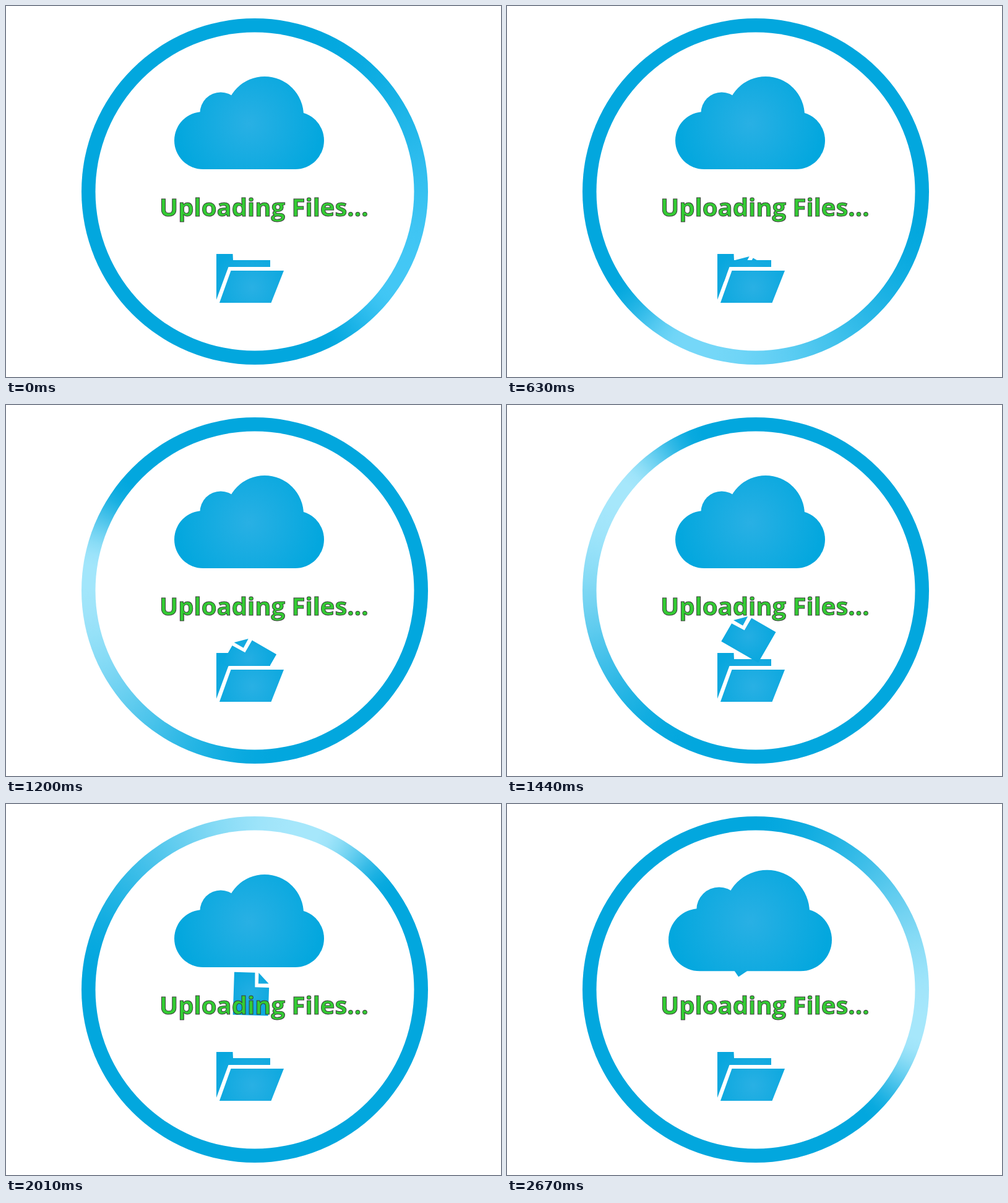
Recreate the animation shown at these times as an HTML page. Size 800 by 600 pixels, loop 2.7 s.

```html
<!DOCTYPE html>
<html lang="en">
<head>
<meta charset="utf-8">
<title>Uploading Files</title>
<style>
html, body { margin: 0; width: 100%; height: 100%; overflow: hidden; background: #fff; }
#ring { position: absolute; left: 122px; top: 20px; width: 560px; height: 560px; border-radius: 50%; }
svg { position: absolute; left: 0; top: 0; display: block; }
text { font: bold 40px "Open Sans", sans-serif; fill: #33cc33; stroke: #3a3a3a; stroke-width: 1px; }
</style>
</head>
<body>
<div id="ring"></div>
<svg width="800" height="600" viewBox="0 0 800 600">
  <defs>
    <radialGradient id="cloudFill" gradientUnits="userSpaceOnUse" cx="393" cy="190" r="118">
      <stop offset="0" stop-color="#29b0e4"/><stop offset="1" stop-color="#03a7de"/>
    </radialGradient>
    <radialGradient id="folderFill" gradientUnits="userSpaceOnUse" cx="398" cy="455" r="66">
      <stop offset="0" stop-color="#29b0e4"/><stop offset="1" stop-color="#08a7de"/>
    </radialGradient>
    <radialGradient id="pageFill" gradientUnits="userSpaceOnUse" cx="34" cy="28" r="45">
      <stop offset="0" stop-color="#24aee3"/><stop offset="1" stop-color="#08a7de"/>
    </radialGradient>
    <clipPath id="aboveFront">
      <path d="M0 0H800V422H359.5L340 475H0Z"/>
    </clipPath>
  </defs>
  <circle cx="402" cy="300" r="257.5" fill="#fff"/>
  <path fill="url(#folderFill)" d="M340 401H366.5L367 411H427V422H359.5L340 475Z"/>
  <g clip-path="url(#aboveFront)">
    <g id="page" fill="url(#pageFill)">
      <path d="M0 23.5L23.5 22.8L23.5 0H69V57H0Z"/>
      <path d="M0 17.5L17 .8L17.5 17.5Z"/>
    </g>
  </g>
  <path fill="url(#folderFill)" d="M363.5 428H449L428.5 480H345Z"/>
  <g id="cloud" fill="url(#cloudFill)">
    <rect x="272" y="171" width="242" height="93" rx="46.5"/>
    <circle cx="347" cy="173" r="33.5"/>
    <circle cx="418" cy="177" r="63"/>
    <rect x="318" y="171" width="149" height="60"/>
  </g>
  <text x="248" y="339.5">Uploading Files...</text>
</svg>
<script>
const LOOP = 2700, STEP = 30;
const BASE = [2, 167, 222], PEAK_FROM = [67, 199, 245], PEAK_TO = [166, 231, 251];
const GLOW = 140;   // length of the ring's glow in degrees
const ring = document.getElementById("ring");
const page = document.getElementById("page");
const cloud = document.getElementById("cloud");

const span = (t, from, to) => Math.max(0, Math.min(1, (t - from) / (to - from)));
const smooth = k => k * k * (3 - 2 * k);
const mix = (a, b, k) => a.map((v, i) => v + (b[i] - v) * k);

// Strength of the glow some degrees behind its head: short front, long tail
const glow = back => smooth(span(back, 0, 32)) * (1 - smooth(span(back, 38, GLOW)));

function drawRing(t) {
  const head = 67 + t * 0.128;
  const peak = mix(PEAK_FROM, PEAK_TO, span(t, 0, 1250));
  const stops = [];
  for (let back = GLOW; back >= 0; back -= 4) {
    stops.push(`rgb(${mix(BASE, peak, glow(back)).map(Math.round)}) ${GLOW - back}deg`);
  }
  // CSS angles start at the top, ours at the right
  ring.style.background = `conic-gradient(from ${head - GLOW + 90}deg, ${stops.join(", ")})`;
}

// The page rises out of the folder, waits, then tumbles up into the cloud
function drawPage(t) {
  const rise = smooth(span(t, 480, 780));
  const fly = span(t, 1200, 2670);
  const x = 393 + 100 * fly * (fly - 0.38) * (0.9 - fly);
  const y = 410.7 + 54 * (1 - rise) - 174 * fly ** 0.87;
  const angle = 30 + 116 * smooth(span(t, 1430, 2540));
  page.setAttribute("transform", `translate(${x} ${y}) rotate(${angle}) translate(-34.5 -28.5)`);
  page.setAttribute("visibility", rise > 0 ? "visible" : "hidden");
}

function drawCloud(t) {
  const s = 1 + 0.1 * span(t, 2370, LOOP);
  cloud.setAttribute("transform", `translate(393 194) scale(${s}) translate(-393 -194)`);
}

function frame() {
  const t = Math.floor((performance.now() % LOOP) / STEP) * STEP;
  drawRing(t);
  drawPage(t);
  drawCloud(t);
  requestAnimationFrame(frame);
}
frame();
</script>
</body>
</html>
```
